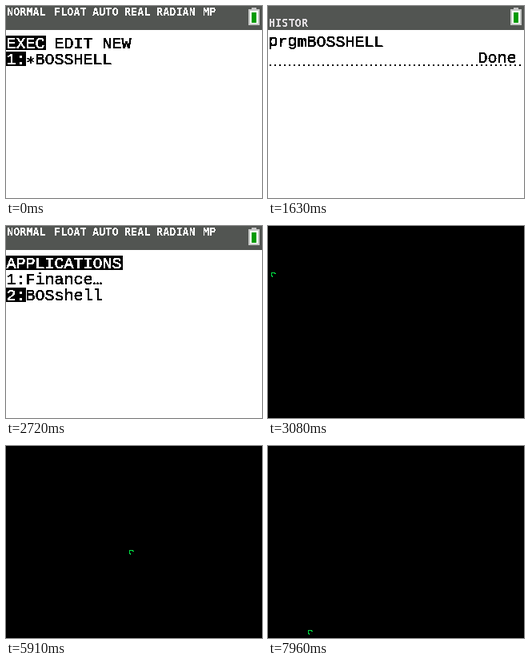
These frames come from a looping animation (320x240 px, 8000 ms). An HTML page:

```html
<!DOCTYPE html>
<html lang="en">
<head>
<meta charset="utf-8">
<title>Calculator shell</title>
<style>
  html, body { margin: 0; width: 100%; height: 100%; overflow: hidden; background: #fff; }
  svg { display: block; width: 320px; height: 240px; shape-rendering: crispEdges; }
  text { white-space: pre; filter: url(#crisp); }
  .big { font: 20px "Liberation Mono", monospace; stroke-width: .5px; transform: translateX(-1.6px); }
  .small { font: bold 13.5px "DejaVu Sans Mono", monospace; stroke: none; }
  .star { font: bold 19px "DejaVu Sans Mono", monospace; stroke: none; }
</style>
</head>
<body>
<svg viewBox="0 0 320 240">
  <defs>
    <filter id="crisp" color-interpolation-filters="sRGB">
      <feComponentTransfer><feFuncA type="discrete" tableValues="0 1"/></feComponentTransfer>
    </filter>
  </defs>
  <g id="calc">
    <rect width="320" height="240" fill="#fff"/>
    <rect width="320" height="30" fill="#525552"/>
    <rect x="307" y="2" width="6" height="2" fill="#c6c7c6"/>
    <rect x="303" y="4" width="14" height="20" fill="#c6c7c6"/>
    <rect x="305" y="6" width="10" height="16" fill="#fff"/>
    <rect x="307" y="8" width="6" height="13" fill="#009a00"/>
    <g id="mode"></g>
    <g id="busy" fill="#fff"></g>
    <g id="page"></g>
  </g>
  <g id="shell">
    <rect width="320" height="240"/>
    <path id="pointer" fill="#00dc42" d="M0 0h5v1h1v1h-2v-1h-3v3h1v2h-1v-1h-1z"/>
  </g>
</svg>
<script>
const LOOP = 8000, STEP = 47.5;
const $ = id => document.getElementById(id);

const rect = (x, y, w, h) => `<rect x="${x}" y="${y}" width="${w}" height="${h}"/>`;
const text = (s, x, y, color = '#000', cls = 'big') =>
  `<text x="${x}" y="${y}" fill="${color}" stroke="${color}" class="${cls}">${s}</text>`;
const small = (s, x, y, color = '#fff') => text(s, x, y, color, 'small');

// Menu rows are 20 px apart
const head = s => rect(0, 37, s.length * 12 + 2, 18) + text(s, 2, 53, '#fff');
const item = (row, key, name, on) => {
  const y = 53 + row * 20;
  return (on ? rect(0, y - 16, 25, 18) : '') + text(key, 2, y, on ? '#fff' : '#000') + text(name, 26, y);
};

const caret = row => rect(2, 37 + row * 20, 10, 14);
const entry = color => text('prgmBOSSHELL', 2, '50 51 50 51', color);
const done = color => text('Done', 264, 71, color);
const dots = Array.from({ length: 53 }, (_, i) => rect(2 + i * 6, 73, 2, 2)).join('');

const words = [['NORMAL', 1], ['FLOAT', 60], ['AUTO', 108], ['REAL', 148], ['RADIAN', 188], ['MP', 246]];
const mode = words.map(([s, x]) => small(s, x, 12)).join('');
const history = s => small(s, 1, 26, '#dedbde');

const programs = head('EXEC') + text('EDIT NEW', 62, 53) + item(1, '1:', '', true) +
  text('*', 25, 77, '#000', 'star') + text('BOSSHELL', 38, 73);
const apps = n => head('APPLICATIONS') + item(1, '1:', 'Finance…', n === 1) + item(2, '2:', 'BOSshell', n === 2);

// [start, page, status, busy]
const scenes = [
  [0, programs, mode],
  [610, '', mode, true],
  [800, entry(), mode, true],
  [900, entry() + rect(146, 37, 10, 14), mode],
  [1130, '', mode, true],
  [1270, entry(), mode, true],
  [1310, entry() + done(), mode, true],
  [1350, entry() + done() + dots + caret(2), mode],
  [1630, entry() + done() + dots, history('HISTOR')],
  [1670, entry() + rect(262, 55, 52, 18) + done('#fff') + dots, mode + history('HISTORY')],
  [1810, rect(2, 35, 146, 18) + entry('#fff') + done() + dots, mode + history('HISTORY')],
  [2040, '', ''],
  [2090, '', mode],
  [2170, caret(0), mode],
  [2310, '', mode],
  [2450, head('APPLICATIONS'), mode, true],
  [2500, apps(1), mode, true],
  [2580, apps(1), mode],
  [2720, apps(2), mode]
];

// Pointer: key-hold bursts [start, steps] and route legs [ticks, dx, dy], 2 px a tick
const bursts = [[3380, 6], [3810, 13], [4730, 69]];
const legs = [
  [16, 1, 0], [20, 0, -1], [8, -1, -1], [9, -1, 0],
  [12, 1, 0], [95, 1, 1], [15, 0, 1], [4, -1, 1], [79, -1, 0]
];

function pointerAt(t) {
  let ticks = 0, x = 4, y = 58;
  for (const [start, steps] of bursts) {
    if (t >= start) ticks += 1 + 3 * Math.min(Math.floor((t - start + 7.5) / STEP), steps - 1);
  }
  for (const [len, dx, dy] of legs) {
    const n = Math.min(len, ticks);
    x += 2 * dx * n;
    y += 2 * dy * n;
    ticks -= n;
  }
  return [x, y];
}

function spinner(t) {
  const turn = Math.floor(t / STEP);
  return Array.from({ length: 8 }, (_, i) => {
    const a = i * Math.PI / 4;
    const x = Math.round(295 + 5 * Math.cos(a)), y = Math.round(11 + 5 * Math.sin(a));
    return (i + 8 - turn % 8) % 8 < 6 ? rect(x, y, 2, 2) : '';
  }).join('');
}

let shown;
function draw() {
  const t = performance.now() % LOOP;
  const dark = t >= 3000;
  $('shell').style.display = dark ? '' : 'none';
  if (dark) {
    $('pointer').style.display = t < 3080 ? 'none' : '';
    $('pointer').setAttribute('transform', `translate(${pointerAt(t)})`);
  } else {
    const scene = scenes.findLast(s => t >= s[0]);
    if (scene !== shown) {
      $('page').innerHTML = scene[1];
      $('mode').innerHTML = scene[2];
      shown = scene;
    }
    $('busy').innerHTML = scene[3] ? spinner(t) : '';
  }
  requestAnimationFrame(draw);
}
draw();
</script>
</body>
</html>
```
